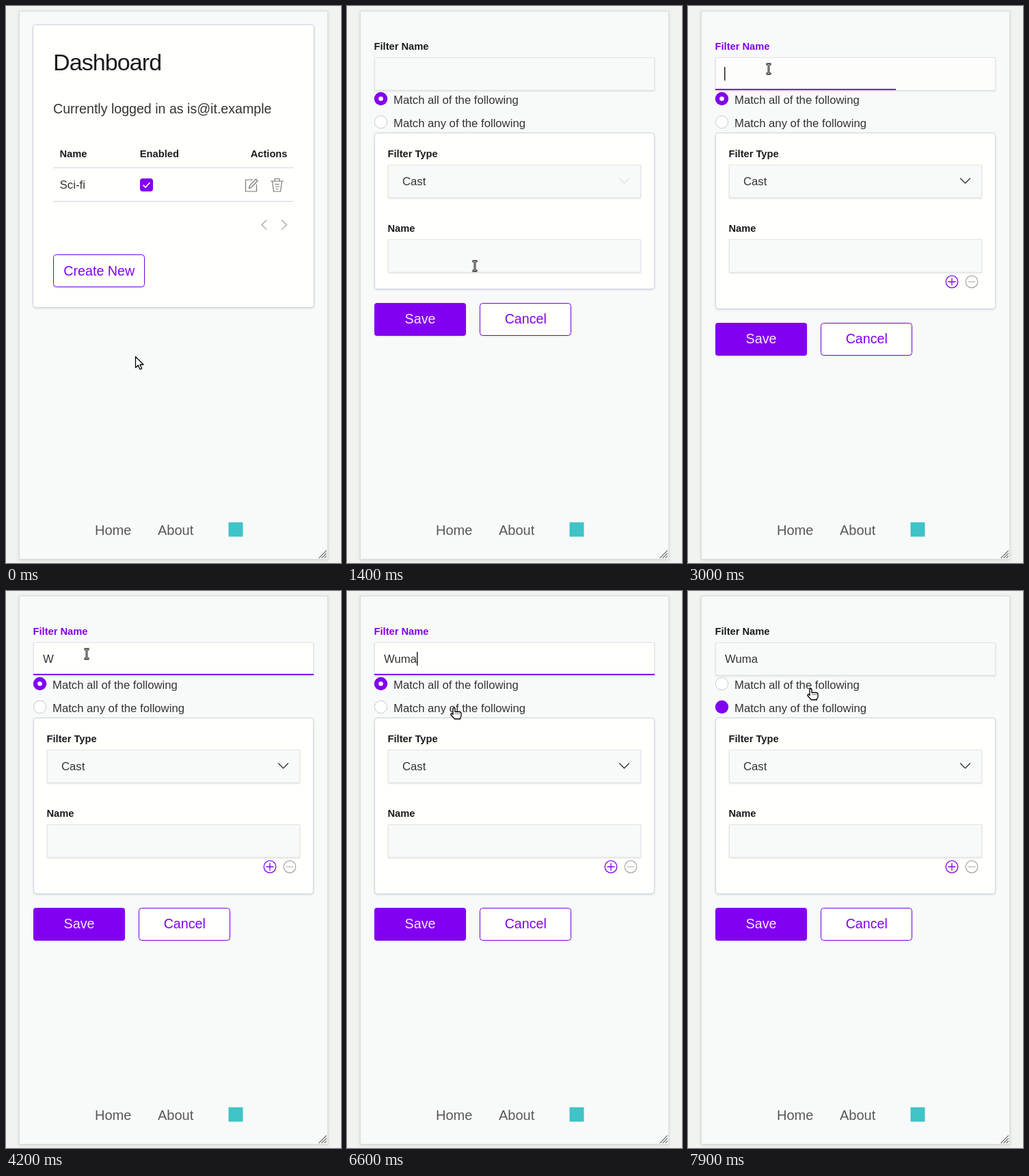
Recreate the animation shown at these times as an HTML page. Size 490 by 814 pixels, loop 8 s.

```html
<!DOCTYPE html>
<html lang="en">
<head>
<meta charset="utf-8">
<title>Filter dashboard</title>
<style>
  :root { --accent: #8200f2; --paper: #fffffc; --page: #f8faf9; }
  html, body { margin: 0; width: 100%; height: 100%; overflow: hidden; background: #f1f3f1; }
  svg { display: block; width: 100%; height: 100%; }
  text { font: 16.7px "Liberation Sans", Arial, sans-serif; fill: #333; white-space: pre; }
  .title { font-size: 34px; letter-spacing: -.9px; fill: #1b1b1e; }
  .bold { font-size: 14.7px; font-weight: bold; fill: #1b1b1e; }
  .nav { font-size: 20px; fill: #585858; }
  .mid { font-size: 19.7px; text-anchor: middle; fill: var(--accent); }
  .end { text-anchor: end; }
  .light { fill: #f4eaff; }
  .card { fill: var(--paper); stroke: #cdd4e4; filter: drop-shadow(0 1px 1.5px #0002); }
  .box { fill: var(--page); stroke: #e2e4ea; filter: drop-shadow(0 1px 1px #0002); }
  .outline { fill: var(--paper); stroke: #7800e0; filter: drop-shadow(0 1px 1px #0001); }
  .solid { fill: var(--accent); }
  .line { fill: none; stroke: #777; stroke-width: 1.2; stroke-linecap: round; stroke-linejoin: round; }
  .pale { stroke: #a5a5a5; }
  .dark { stroke: #333; stroke-width: 1.4; }
  .purple { stroke: var(--accent); stroke-width: 1.3; }
  .rule { stroke: #d3d7de; }
  .ring { fill: #fff; stroke: #c9c9c9; }
  .ink { fill: #fff; stroke: #000; stroke-width: 1.3; stroke-linejoin: round; }

  /* One second of the 8 s loop is 12.5 %. */
  .dash, .form, .list, .actions, .cursor, .arrow, .hand, .beam, .caret, .typed { animation: 8s step-end infinite; }
  .chevron, .icons, .label, .focus, .underline, .all, .any, .halo { animation: 8s linear infinite; }

  .dash { animation-name: dash; }
  .form { animation-name: form; }
  @keyframes dash { 0% { visibility: visible } 17.5%, 100% { visibility: hidden } }
  @keyframes form { 0% { visibility: hidden } 17.5%, 100% { visibility: visible } }

  .list { animation-name: list; }
  .actions { animation-name: actions; }
  .chevron { animation-name: chevron; }
  .icons { animation-name: icons; }
  @keyframes list { 0% { height: 228px } 18.75%, 100% { height: 257px } }
  @keyframes actions { 0% { transform: translateY(-29px) } 18.75%, 100% { transform: none } }
  @keyframes chevron { 0%, 17.5% { opacity: .12 } 22.5%, 100% { opacity: 1 } }
  @keyframes icons { 0%, 18.2% { opacity: 0 } 22.5%, 100% { opacity: 1 } }

  .label { animation-name: label; }
  .focus { animation-name: focus; }
  .underline { animation-name: underline; transform-origin: 40px 0; }
  @keyframes label { 0%, 35.8%, 91%, 100% { fill: #1b1b1e } 37.5%, 88.4% { fill: var(--accent) } }
  @keyframes focus { 0%, 35.8%, 91.5%, 100% { opacity: 0 } 38%, 88.4% { opacity: 1 } }
  @keyframes underline {
    0%, 35.8% { transform: scaleX(0); animation-timing-function: ease-out }
    39.5%, 88.4% { transform: none; animation-timing-function: ease-in }
    92.2%, 100% { transform: scaleX(0) }
  }

  .typed { animation-name: typed; }
  .caret { animation-name: caret; }
  @keyframes typed {
    0% { clip-path: inset(0 100% 0 0) }
    52.5% { clip-path: inset(0 67.3% 0 0) }
    53.75% { clip-path: inset(0 48.1% 0 0) }
    57.5% { clip-path: inset(0 19.2% 0 0) }
    58.75%, 100% { clip-path: inset(0 0 0 0) }
  }
  @keyframes caret {
    0% { opacity: 0; transform: none }
    36.25% { opacity: 1; transform: none }
    52.5% { opacity: 0; transform: none }
    53.75% { opacity: 1; transform: translateX(26px) }
    57.5% { opacity: 1; transform: translateX(39.5px) }
    58.75% { opacity: 1; transform: translateX(49px) }
    66.25% { opacity: 0; transform: translateX(49px) }
    82.5% { opacity: 1; transform: translateX(49px) }
    88.75%, 100% { opacity: 0; transform: translateX(49px) }
  }

  .all { animation-name: all; }
  .any { animation-name: any; }
  .halo { animation-name: halo; }
  @keyframes all { 0%, 88.4% { opacity: 1 } 91%, 100% { opacity: 0 } }
  @keyframes any { 0%, 88.4% { opacity: 0 } 91%, 100% { opacity: 1 } }
  @keyframes halo {
    0%, 88.4% { opacity: 0; r: 9.5px }
    90% { opacity: .2; r: 14px }
    92.5% { opacity: .2; r: 12.5px }
    95% { opacity: .12; r: 12.5px }
    98.7%, 100% { opacity: 0; r: 12.5px }
  }

  .cursor { animation-name: move; }
  .arrow { animation-name: arrow; }
  .hand { animation-name: hand; }
  .beam { animation-name: beam; }
  @keyframes arrow { 0% { opacity: 1 } 8.75%, 100% { opacity: 0 } }
  @keyframes hand { 0% { opacity: 0 } 8.75% { opacity: 1 } 17.5% { opacity: 0 } 67.5%, 100% { opacity: 1 } }
  @keyframes beam { 0% { opacity: 0 } 17.5% { opacity: 1 } 67.5%, 100% { opacity: 0 } }
  @keyframes move {
    0% { transform: translate(189px, 512px) }
    6.25% { transform: translate(192px, 485px) }
    7.5% { transform: translate(194px, 445px) }
    8.75% { transform: translate(190px, 400px) }
    10% { transform: translate(186px, 378px) }
    12.5% { transform: translate(186px, 377px) }
    17.5% { transform: translate(187px, 380px) }
    21.25% { transform: translate(187px, 352px) }
    22.5% { transform: translate(188px, 300px) }
    23.75% { transform: translate(189px, 240px) }
    25% { transform: translate(189px, 185px) }
    26.25% { transform: translate(189px, 143px) }
    27.5% { transform: translate(124px, 79px) }
    28.75% { transform: translate(122px, 84px) }
    30% { transform: translate(119px, 90px) }
    31.25% { transform: translate(118px, 92px) }
    66.25% { transform: translate(132px, 125px) }
    67.5% { transform: translate(147px, 152px) }
    70% { transform: translate(155px, 169px) }
    71.25% { transform: translate(155px, 171px) }
    75% { transform: translate(157px, 171px) }
    76.25% { transform: translate(156px, 170px) }
    91.25% { transform: translate(163px, 160px) }
    92.5% { transform: translate(175px, 146px) }
    95%, 100% { transform: translate(179px, 142px) }
  }
</style>
</head>
<body>
<svg viewBox="0 0 490 814">
  <rect width="490" height="814" fill="#f1f3f1"/>
  <rect x="19.5" y="7.5" width="451" height="801" fill="#f8faf9" stroke="#dadcda" style="filter:drop-shadow(0 1px 2px #0002)"/>
  <path class="line" d="M458 806.5l10.5-10.5M462 806.5l6.5-6.5M466 806.5l2.5-2.5"/>

  <text class="nav" x="130" y="773">Home</text>
  <text class="nav" x="222" y="773">About</text>
  <rect x="325.5" y="754.5" width="21" height="21" fill="#3fc3c6"/>

  <g class="dash">
    <rect class="card" x="39.5" y="27.5" width="411" height="413" rx="4"/>
    <text class="title" x="69" y="94">Dashboard</text>
    <text x="69" y="157" style="font-size:19.6px">Currently logged in as is@it.example</text>
    <text class="bold" x="78.5" y="221">Name</text>
    <text class="bold" x="195.8" y="221">Enabled</text>
    <text class="bold end" x="411.5" y="221">Actions</text>
    <path class="rule" d="M69 236.5H421M69 285.5H421"/>
    <text x="78.5" y="267" style="font-size:16.9px">Sci-fi</text>
    <rect class="solid" x="196" y="252" width="19" height="19" rx="4"/>
    <path d="M200.5 261.5l3.5 3.5 6.500-7" fill="none" stroke="#fff" stroke-width="1.7"/>
    <path class="line" d="M361 254H350.500V271H366.500V261M355.500 266.500l1-4 9-9.500 2.500 2.500-9 9.500z"/>
    <path class="line" d="M387.500 256H405.500M393 256v-3.500h7v3.500M389.500 256l2 15h10l2-15M393.500 260.500h6M394.500 264h5M395 267.500h3"/>
    <path class="line pale" d="M381 313l-7 6.800 7 6.800M403.500 313l7 6.800-7 6.800"/>
    <rect class="outline" x="69.5" y="363.5" width="133" height="47" rx="4"/>
    <text class="mid" x="136.300" y="394">Create New</text>
  </g>

  <g class="form">
    <text class="bold label" x="39.5" y="64">Filter Name</text>
    <rect class="box" x="40.5" y="75.5" width="409" height="47.5"/>
    <rect class="focus" x="41" y="76" width="408" height="46.5" fill="#fffffc"/>
    <rect class="solid underline" x="40" y="121" width="410" height="2"/>
    <text class="typed" x="54" y="105">Wuma</text>
    <rect class="caret" x="53" y="89" width="1.500" height="20" fill="#222"/>

    <circle class="ring" cx="49.5" cy="135.5" r="9.2"/>
    <g class="all">
      <circle class="solid" cx="49.5" cy="135.5" r="9.7"/>
      <circle cx="49.5" cy="135.5" r="3.3" fill="#fff"/>
    </g>
    <text x="68" y="143">Match all of the following</text>
    <circle class="solid halo" cx="49.5" cy="169.5" r="9.5"/>
    <circle class="ring" cx="49.5" cy="169.5" r="9.2"/>
    <circle class="solid any" cx="49.5" cy="169.5" r="9.7"/>
    <text x="68" y="177">Match any of the following</text>

    <rect class="card list" x="40.5" y="185.5" width="409" height="257" rx="4"/>
    <text class="bold" x="59.5" y="221">Filter Type</text>
    <rect class="box" x="60.5" y="232.5" width="369" height="47.5"/>
    <text x="81" y="262">Cast</text>
    <path class="line dark chevron" d="M398.500 252l7 7 7-7"/>
    <text class="bold" x="59.5" y="330">Name</text>
    <rect class="box" x="60.5" y="341.5" width="369" height="47.5"/>
    <g class="icons">
      <path class="line purple" d="M377.200 403a8.800 8.800 0 1 1 17.600 0a8.800 8.800 0 1 1-17.600 0M381 403h10M386 398v10"/>
      <path class="line pale" d="M406.200 403a8.800 8.800 0 1 1 17.600 0a8.800 8.800 0 1 1-17.600 0M410 403h10"/>
    </g>

    <g class="actions">
      <rect class="solid" x="40" y="463" width="134" height="48" rx="4" style="filter:drop-shadow(0 1px 1px #0002)"/>
      <text class="mid light" x="107" y="493">Save</text>
      <rect class="outline" x="194.5" y="463.5" width="133" height="47" rx="4"/>
      <text class="mid" x="261.300" y="493">Cancel</text>
    </g>
  </g>

  <g class="cursor">
    <path class="ink arrow" d="M.5.5V16.500l3.800-3.500 2.700 6 2.700-1.200-2.700-5.800h5z"/>
    <g class="hand">
      <path class="ink" d="M-1 1.500q1.500-1.500 3 0V6.500H8.500q2.500.3 2.500 2.500V13l-1.500 2.500V17H1.500L-4 11q-.5-2 1.500-2L-1 10.500z"/>
      <path d="M2.500 9.500h1.200M5 9.500h1.200M7.500 9.500h1.200" stroke="#000" stroke-width="1.200"/>
    </g>
    <g class="beam" fill="none">
      <path d="M-3.500-7h2.500l1 1 1-1h2.500M0-6V6M-3.500 7h2.500l1-1 1 1h2.500" stroke="#000" stroke-width="2.800"/>
      <path d="M-2.800-7h1.800l1 1 1-1h1.800M0-6V6M-2.800 7h1.800l1-1 1 1h1.800" stroke="#fff" stroke-width=".9"/>
    </g>
  </g>
</svg>
</body>
</html>
```
